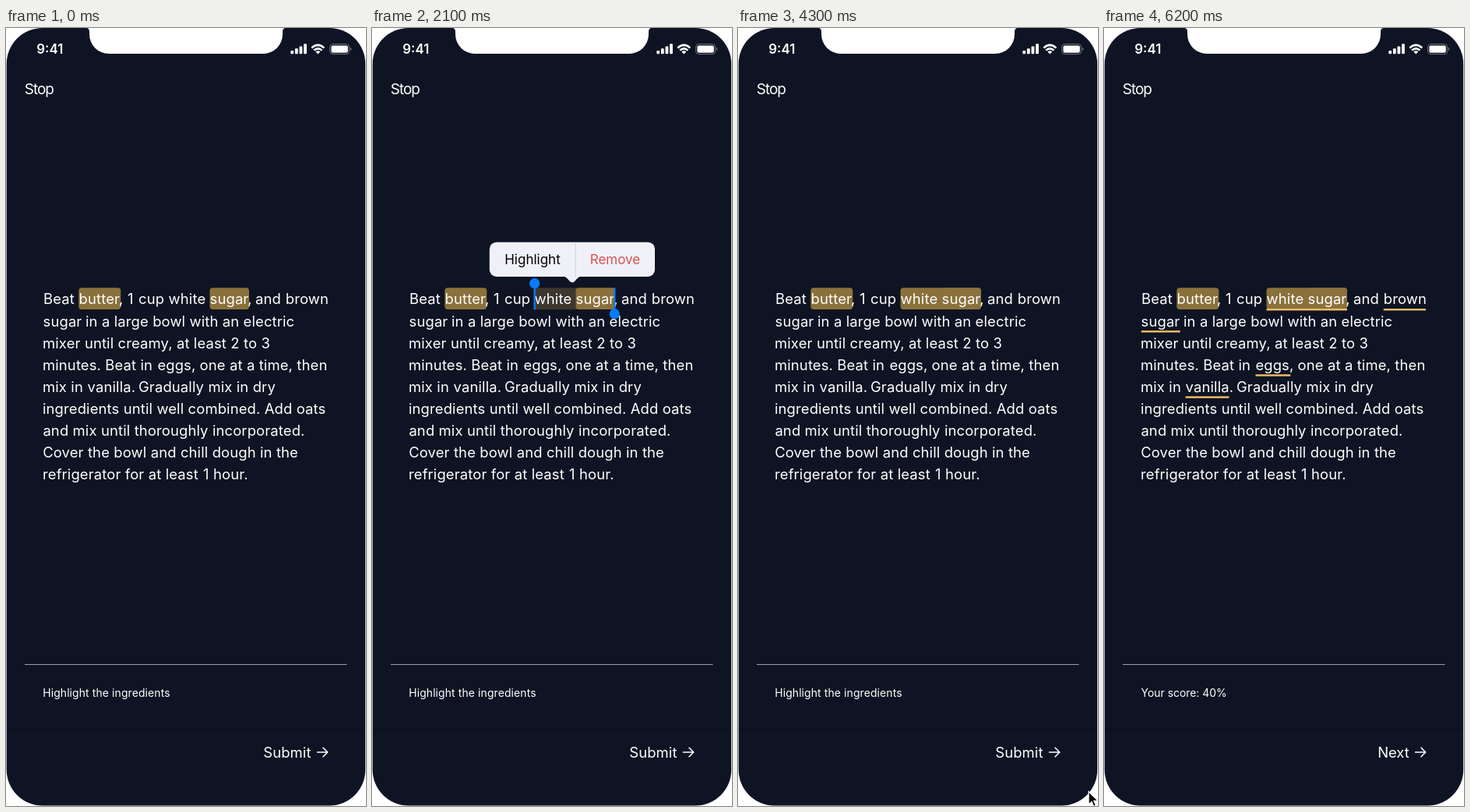
Recreate the animation shown at these times as an HTML page. Size 462 by 998 pixels, loop 7.32 s.

```html
<!DOCTYPE html>
<html lang="en">
<head>
<meta charset="utf-8">
<title>Highlight the ingredients</title>
<style>
  html, body { margin: 0; width: 100%; height: 100%; overflow: hidden; background: #fff; }
  svg { display: block; width: 462px; height: 998px; font-family: Inter, Roboto, sans-serif; font-size: 18.43px; fill: #fff; }
  .mark { fill: #8a713b; }
  .line { fill: none; stroke: #fff; stroke-linecap: round; stroke-linejoin: round; }
  #recipe, #before { letter-spacing: .13px; }
  #handles { fill: #087bfd; }
  #menu { font-size: 17px; text-anchor: middle; }
  .small { font-size: 13.9px; }
  .end { text-anchor: end; }
</style>
</head>
<body>
<svg viewBox="0 0 462 998">
  <rect x=".7" y="0" width="460.5" height="997.4" rx="46" fill="#0e1423"/>
  <path d="M103 0Q107 0 107 5V8A25 25 0 0 0 132 33H330A25 25 0 0 0 355 8V5Q355 0 359 0Z"/>

  <!-- status bar -->
  <text x="39.3" y="33" font-size="16.9" font-weight="600">9:41</text>
  <g id="signal"></g>
  <path class="line" stroke-width="2.5" style="stroke-linecap:butt" d="M392.3 25.6Q400.3 18.2 408.3 25.6M395.2 28.7Q400.3 24 405.4 28.7"/>
  <path d="M397.3 30.4Q400.3 28 403.3 30.4L400.3 33.5Z"/>
  <rect x="415.6" y="20.6" width="25" height="13" rx="4" fill="none" stroke="#fff" stroke-opacity=".4"/>
  <rect x="417.4" y="22.4" width="21.4" height="9.4" rx="2.2"/>
  <path d="M442 24.8Q444.6 27 442 29.4Z" opacity=".45"/>

  <text x="23.7" y="85.4" font-size="19" letter-spacing="-1">Stop</text>

  <!-- word marks -->
  <rect class="mark" x="93.3" y="333.3" width="54" height="27.8" rx="4"/>
  <rect id="tint" y="333.3" height="27.8" fill="#3d372f"/>
  <rect class="mark" x="261.5" y="333.3" width="50.5" height="27.8" rx="4"/>
  <rect class="mark" id="merged" x="208.5" y="333.3" width="103.5" height="27.8" rx="4"/>
  <g id="answers" fill="#f7bd65"></g>
  <g id="recipe"></g>

  <g id="handles">
    <g id="left"><rect x="-1.2" y="328" width="2.4" height="33.2"/><circle cy="327.7" r="6.6"/></g>
    <g id="right"><rect x="-1.2" y="333.3" width="2.4" height="33"/><circle cy="366.7" r="6.6"/></g>
  </g>

  <g id="menu">
    <path d="M245 318Q249 319 253 324Q257 329 261 324Q265 319 269 318Z" fill="#f0f1f8"/>
    <rect x="150.8" y="274.7" width="212.2" height="44.3" rx="9" fill="#f0f1f8"/>
    <path id="pressed" d="M261 274.7V319H159.8Q150.8 319 150.8 310V283.7Q150.8 274.7 159.8 274.7Z" fill="#e3e3e4"/>
    <path d="M261.2 274.7V319" stroke="#d0d1d6"/>
    <text x="206" y="303" fill="#000">Highlight</text>
    <text x="312" y="303" fill="#d9504f">Remove</text>
  </g>

  <!-- footer -->
  <path d="M24 816.5H437.5" stroke="#9b9ea6" stroke-width="1.2"/>
  <path d="M1 899.5H461" stroke="#090d18"/>
  <g id="before">
    <text class="small" x="47.2" y="858">Highlight the ingredients</text>
    <text class="end" x="391.6" y="935.6">Submit</text>
  </g>
  <g id="after">
    <text class="small" x="47.6" y="858">Your score: 40%</text>
    <text class="end" x="391.8" y="935.6">Next</text>
  </g>
  <path class="line" stroke-width="1.6" d="M399.5 929H412.5M407 923.3L412.7 929L407 934.7"/>

  <path id="cursor" d="M0 0V16.5L3.9 12.9L6.6 19L9.3 17.8L6.7 11.8H12Z" fill="#000" stroke="#fff" stroke-width="1.2"/>
</svg>
<script>
const LOOP = 7320, STEP = 100, LEADING = 28.1;
const $ = id => document.getElementById(id);

function add(parent, tag, attrs, text = '') {
  const el = document.createElementNS('http://www.w3.org/2000/svg', tag);
  for (const key in attrs) el.setAttribute(key, attrs[key]);
  el.textContent = text;
  $(parent).append(el);
}

// each line: alternating x and text
const lines = [
  [48, 'Beat', 93.6, 'butter,', 156, '1', 170, 'cup', 208.6, 'white', 261.6, 'sugar,', 320, 'and', 358.8, 'brown'],
  [47.6, 'sugar', 102, 'in a large bowl with an electric'],
  [47, 'mixer until creamy, at least 2 to 3'],
  [47, 'minutes. Beat in', 194.4, 'eggs,', 248.6, 'one at a time, then'],
  [47, 'mix in', 104.6, 'vanilla.', 170, 'Gradually mix in dry'],
  [47, 'ingredients until well combined. Add oats'],
  [47.4, 'and mix until thoroughly incorporated.'],
  [47.2, 'Cover the bowl and chill dough in the'],
  [47, 'refrigerator for at least', 253, '1', 266, 'hour.']
];
lines.forEach((line, row) => {
  for (let i = 0; i < line.length; i += 2)
    add('recipe', 'text', { x: line[i], y: 354.4 + row * LEADING }, line[i + 1]);
});

// row, left, right
for (const [row, x, end] of [[0, 208.5, 312], [0, 358.8, 413], [1, 47.8, 97.8], [3, 194.5, 239.3], [4, 104.6, 160.5]])
  add('answers', 'rect', { x, y: 360 + row * LEADING, width: end - x, height: 2.4 });

[4.4, 7, 9.8, 13].forEach((height, i) =>
  add('signal', 'rect', { x: 365.3 + i * 5.6, y: 33.3 - height, width: 3.8, height, rx: 1 }));

const ramp = (t, from, to) => Math.min(1, Math.max(0, (t - from) / (to - from)));
const ease = p => p < .5 ? 4 * p ** 3 : 1 - 4 * (1 - p) ** 3;
const mix = (a, b, p) => a + (b - a) * p;
const fade = (id, opacity) => $(id).setAttribute('opacity', opacity);
const move = (id, x, y = 0) => $(id).setAttribute('transform', `translate(${x} ${y})`);

function draw(time) {
  const t = Math.floor(time % LOOP / STEP) * STEP;
  const drag = ease(ramp(t, 1150, 1700));
  const done = ramp(t, 3000, 3300);
  const review = ramp(t, 4300, 4800);
  const left = mix(261.8, 208.7, drag);

  move('left', left);
  move('right', mix(312.6, 311.3, drag));
  fade('handles', ramp(t, 0, 600) * (1 - done));
  $('tint').setAttribute('x', left);
  $('tint').setAttribute('width', Math.max(0, 263 - left));
  fade('tint', drag > .01 ? 1 - done : 0);
  fade('merged', done);

  fade('menu', ramp(t, 1900, 2100) * (1 - done));
  fade('pressed', t >= 2600 ? 1 : 0);

  fade('answers', review);
  fade('after', review);
  fade('before', 1 - review);

  fade('cursor', t >= 4300 && t < 4900 ? 1 : 0);
  const glide = ramp(t, 4300, 4800);
  move('cursor', mix(450, 455.5, glide), mix(979.5, 926, glide));
}

const start = performance.now();
function tick() {
  draw(performance.now() - start);
  requestAnimationFrame(tick);
}
tick();
</script>
</body>
</html>
```
